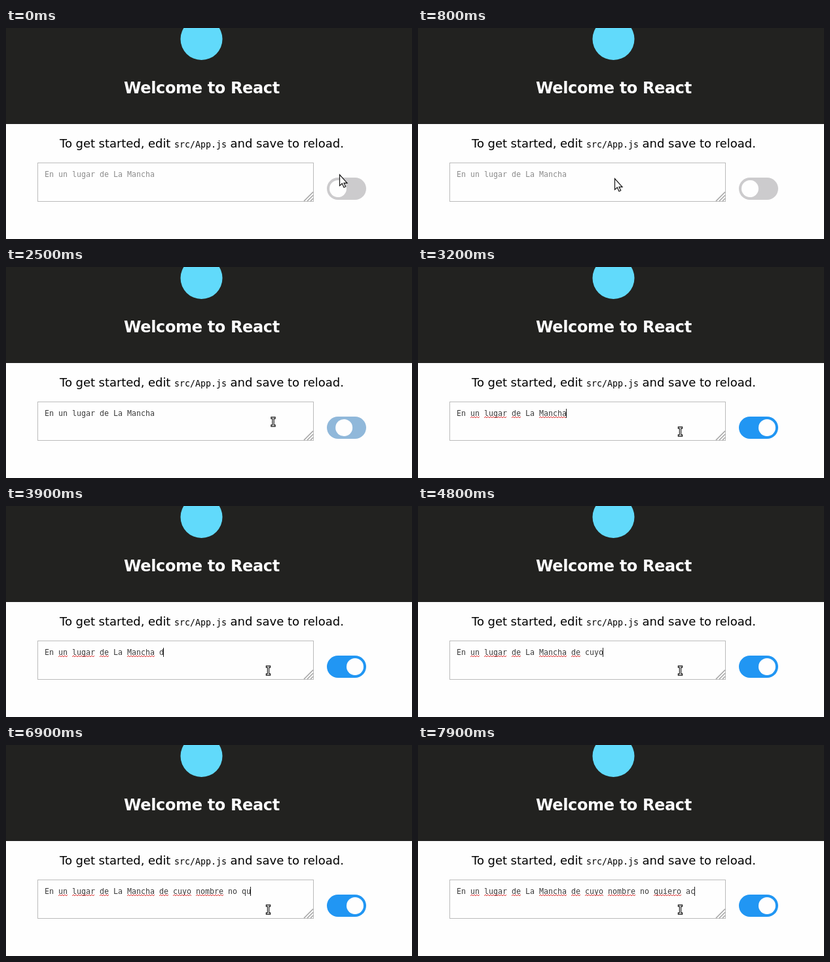
Animation, 620 px wide and 323 px high, one loop 8 s. Source, as an HTML page:

```html
<!DOCTYPE html>
<html lang="en">
<head>
<meta charset="utf-8">
<title>Toggle and typing</title>
<style>
  html, body { margin: 0; width: 100%; height: 100%; overflow: hidden; background: #fefefe; }
  svg { display: block; }
  text { font-family: "DejaVu Sans", sans-serif; font-size: 18px; }
  .title { font-size: 24px; font-weight: bold; letter-spacing: -.35px; fill: #fff; }
  .lead { letter-spacing: -.05px; }
  .code, #typed { font-family: "DejaVu Sans Mono", monospace; }
  .code { font-size: 13.29px; }
  #typed { font-size: 11.63px; }
</style>
</head>
<body>
<svg width="620" height="323" viewBox="0 0 620 323">
  <rect width="620" height="147" fill="#222220"/>
  <circle cx="298.5" cy="17" r="32" fill="#61dafb"/>
  <text class="title" x="180" y="100">Welcome to React</text>
  <text class="lead" x="82" y="183">To get started, edit</text>
  <text class="code" x="257" y="183">src/App.js</text>
  <text x="342.5" y="183">and save to reload.</text>

  <rect x="48.5" y="206.5" width="421" height="59" fill="#fefefe" stroke="#bbb"/>
  <path d="M455 265L469 251M460 265L469 256M465 265L469 261" stroke="#a4a4a4" stroke-width="1.5"/>
  <text id="typed" x="59" y="228"></text>
  <path id="waves" fill="none" stroke="#d33" stroke-width="1"/>
  <path id="caret" stroke="#222"/>

  <rect id="track" x="490" y="229" width="60" height="34" rx="17"/>
  <circle id="knob" cy="246" r="13" fill="#fefefe"/>

  <g id="pointer">
    <path id="arrow" d="M.5 .5V17.5L4.3 14L7 20L9.7 18.8L7 13.3H12Z" fill="#fff" stroke="#111" stroke-width="1.2"/>
    <path id="hand" d="M-1.5 9V1Q0-1 1.5 1V7L8 9Q10 10 9 14L7 19H-1L-6 12Q-5 9-1.5 12Z" fill="#fff" stroke="#111" stroke-width="1.2"/>
    <g id="beam" fill="none" stroke-linecap="square">
      <path d="M-2-6H2M0-6V6M-2 6H2" stroke="#111" stroke-width="3.4"/>
      <path d="M-2-6H2M0-6V6M-2 6H2" stroke="#fff" stroke-width="1.2"/>
    </g>
  </g>
</svg>
<script>
const LOOP = 8000, STEP = 100, CHAR = 7, LEFT = 59;
const ENABLED = 2410, FOCUSED = 3000;
const phrase = "En un lugar de La Mancha de cuyo nombre no quiero ac";
const known = ["En", "La", "no"];

// Keys are [time, value, ...]
const pointerKeys = [
  [0, 509, 224], [200, 496, 225], [800, 300, 230], [900, 243, 232], [1100, 165, 234],
  [1300, 153, 235], [1800, 290, 235], [2000, 370, 258], [2100, 420, 263],
  [2300, 500, 250], [2400, 498, 247], [2500, 408, 237], [2800, 400.5, 252]
];
const typingKeys = [
  [3600, 24], [3700, 25], [3900, 26], [4500, 28], [5100, 36],
  [5700, 36], [6300, 40], [6900, 45], [7200, 47], [7900, 52]
];

const $ = id => document.getElementById(id);
const set = (id, name, value) => $(id).setAttribute(name, value);
const show = (id, on) => set(id, "visibility", on ? "visible" : "hidden");
const mix = (a, b, p) => a + (b - a) * p;
const within = (t, a, b) => t >= a && t < b;

function sample(keys, t) {
  if (t <= keys[0][0]) return keys[0].slice(1);
  const i = keys.findIndex(k => k[0] > t);
  if (i < 0) return keys[keys.length - 1].slice(1);
  const a = keys[i - 1], b = keys[i];
  return a.slice(1).map((v, j) => mix(v, b[j + 1], (t - a[0]) / (b[0] - a[0])));
}

// CSS "ease": cubic-bezier(.25, .1, .25, 1)
function ease(x) {
  if (x <= 0 || x >= 1) return x <= 0 ? 0 : 1;
  const bezier = (u, a, b) => 3 * u * (1 - u) ** 2 * a + 3 * u * u * (1 - u) * b + u ** 3;
  let lo = 0, hi = 1;
  for (let i = 0; i < 20; i++) {
    const mid = (lo + hi) / 2;
    if (bezier(mid, .25, .25) < x) lo = mid; else hi = mid;
  }
  return bezier(lo, .1, 1);
}

function squiggles(text) {
  let d = "";
  for (const m of text.matchAll(/\S+(?=\s)/g)) {
    if (known.includes(m[0])) continue;
    const start = LEFT + m.index * CHAR, end = start + m[0].length * CHAR;
    for (let x = start; x <= end; x += 2)
      d += (x === start ? "M" : "L") + x + " " + ((x - start) % 4 ? 229 : 231);
  }
  return d;
}

function draw(t) {
  const on = ease((t - ENABLED) / 400);
  const rgb = [[204, 33], [203, 150], [205, 243]].map(([a, b]) => Math.round(mix(a, b, on)));
  set("track", "fill", `rgb(${rgb})`);
  set("knob", "cx", mix(507, 533, on));

  const count = Math.floor(sample(typingKeys, t)[0] + 1e-6);
  const text = phrase.slice(0, count);
  $("typed").textContent = text;
  set("typed", "fill", t < ENABLED ? "#8c8c8c" : "#3c3c3c");
  set("waves", "d", t < FOCUSED ? "" : squiggles(count === 24 ? text + " " : text));
  set("caret", "d", `M${LEFT + count * CHAR - .5} 217V231`);
  show("caret", t >= FOCUSED && !within(t, 3500, 3700) && !within(t, 5600, 5800));

  const [x, y] = sample(pointerKeys, t);
  set("pointer", "transform", `translate(${x} ${y})`);
  const hand = within(t, 2300, 2500), beam = t >= 2500;
  show("hand", hand);
  show("beam", beam);
  show("arrow", !hand && !beam);
}

const begin = performance.now();
function tick() {
  const t = (performance.now() - begin) % LOOP;
  draw(Math.floor(t / STEP) * STEP);
  requestAnimationFrame(tick);
}
tick();
</script>
</body>
</html>
```
